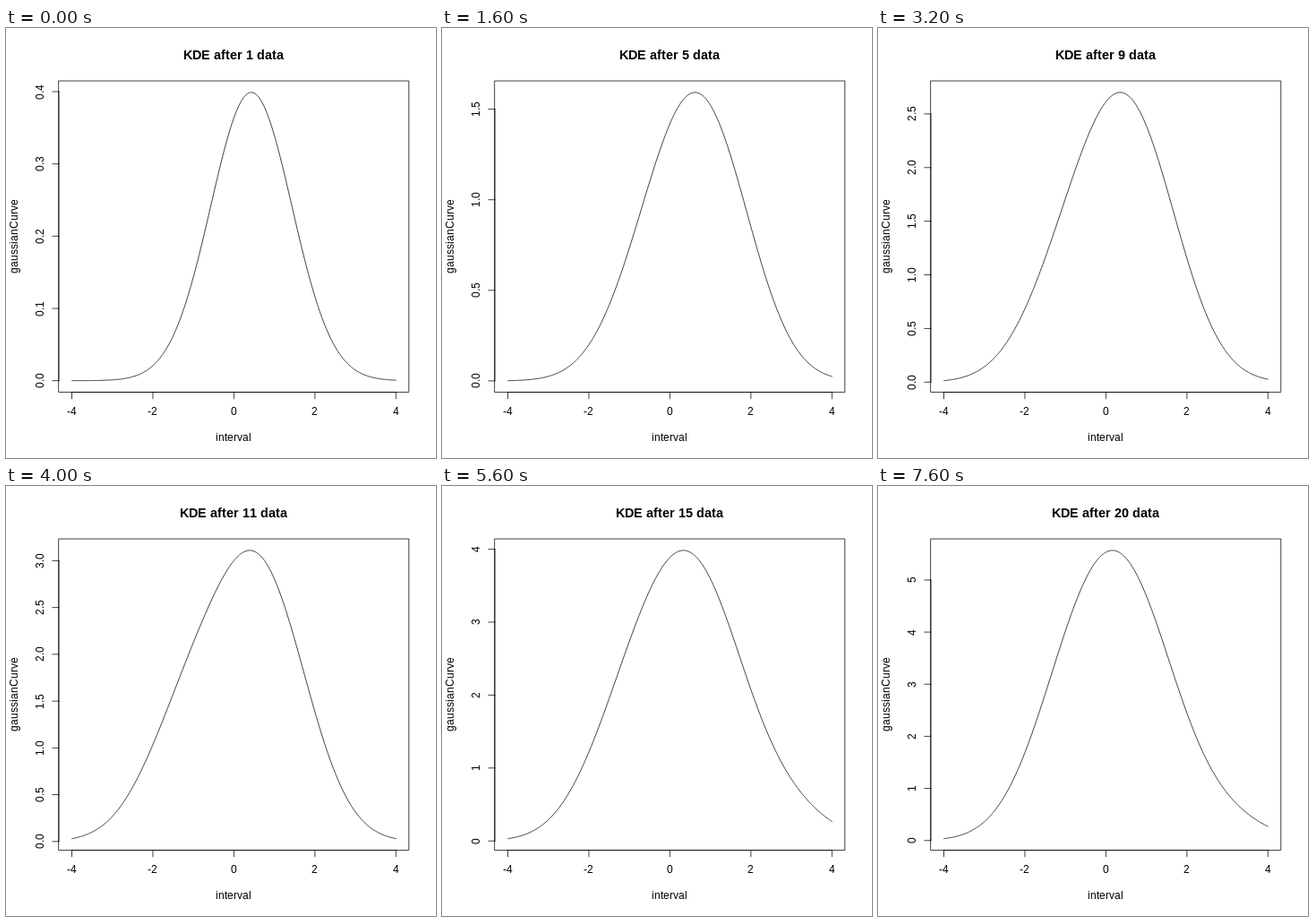
Recreate the animation shown at these times as an HTML page with a canvas. Size 480x480 px, loop 8000 ms.

```html
<!DOCTYPE html>
<html lang="en">
<head>
<meta charset="utf-8">
<title>KDE</title>
<style>
  html, body { margin: 0; width: 100%; height: 100%; overflow: hidden; background: #fff; }
  canvas { display: block; }
</style>
</head>
<body>
<canvas id="plot" width="480" height="480"></canvas>
<script>
const ctx = document.getElementById('plot').getContext('2d');
const STEP = 400;
const FONT = '"Liberation Sans", Arial, sans-serif';
const BOX = { left: 59.04, right: 449.76, top: 59.04, bottom: 406.56 };

// One sample joins the estimate at every step.
const samples = [
  0.43, 1.1, 0.35, -0.6, 1.5, -1.33, 0.75, -0.5, 0.35, 0.95,
  -1.475, -0.5, 2.9, 1.5, 0, 0.4, -0.2, 0.85, -0.7, -0.77
];

const gauss = d => Math.exp(-d * d / 2) / Math.sqrt(2 * Math.PI);
const density = (x, n) => samples.slice(0, n).reduce((sum, s) => sum + gauss(x - s), 0);

// The data fill the box except for a 4% margin on each side.
function scale(min, max, from, to) {
  const pad = (to - from) * 0.04 / 1.08;
  return v => from + pad + (v - min) / (max - min) * (to - from - 2 * pad);
}

function tickStep(range) {
  const cell = range * 1.08 / 5;
  const base = 10 ** Math.floor(Math.log10(cell));
  const c = cell / base;
  return base * (c > 7.78 ? 10 : c > 3.11 ? 5 : c > 1.556 ? 2 : 1);
}

function line(x1, y1, x2, y2) {
  ctx.beginPath();
  ctx.moveTo(x1, y1);
  ctx.lineTo(x2, y2);
  ctx.stroke();
}

// Centred text whose glyphs sit on whole pixels.
function text(str, x, y, { size = 12, weight = 'normal', turned = false } = {}) {
  ctx.font = `${weight} ${size}px ${FONT}`;
  const glyphs = [...String(str)].map(ch => [ch, Math.round(ctx.measureText(ch).width)]);
  const half = glyphs.reduce((sum, g) => sum + g[1], 0) / 2;
  ctx.save();
  if (turned) {
    ctx.translate(x, Math.round(y + half));
    ctx.rotate(-Math.PI / 2);
  } else {
    ctx.translate(Math.round(x - half), y);
  }
  let pen = 0;
  for (const [ch, width] of glyphs) {
    ctx.fillText(ch, pen, 0);
    pen += width;
  }
  ctx.restore();
}

function draw(n) {
  const points = Array.from({ length: 401 }, (_, i) => {
    const x = -4 + i * 0.02;
    return [x, density(x, n)];
  });
  const values = points.map(p => p[1]);
  const min = Math.min(...values), max = Math.max(...values);
  const px = scale(-4, 4, BOX.left, BOX.right);
  const py = scale(min, max, BOX.bottom, BOX.top);

  ctx.fillStyle = '#fff';
  ctx.fillRect(0, 0, 480, 480);
  ctx.fillStyle = ctx.strokeStyle = '#000';
  ctx.lineWidth = 0.75;
  ctx.lineJoin = ctx.lineCap = 'round';

  ctx.beginPath();
  for (const [x, y] of points) ctx.lineTo(px(x), py(y));
  ctx.stroke();

  ctx.strokeRect(BOX.left, BOX.top, BOX.right - BOX.left, BOX.bottom - BOX.top);

  line(px(-4), BOX.bottom, px(4), BOX.bottom);
  for (let x = -4; x <= 4; x += 2) {
    line(px(x), BOX.bottom, px(x), BOX.bottom + 7.2);
    text(x, px(x), 432);
  }

  const step = tickStep(max - min);
  const count = Math.floor((max + (max - min) * 0.04) / step);
  line(BOX.left, py(0), BOX.left, py(count * step));
  for (let i = 0; i <= count; i++) {
    const y = py(i * step);
    line(BOX.left - 7.2, y, BOX.left, y);
    text((i * step).toFixed(step < 0.99 ? 1 : 0), 42, y, { turned: true });
  }

  text(`KDE after ${n} data`, 254.4, 35, { size: 14.4, weight: 'bold' });
  text('interval', 254.4, 461);
  text('gaussianCurve', 13, 232.8, { turned: true });
}

function tick() {
  draw(Math.floor(performance.now() / STEP) % samples.length + 1);
  requestAnimationFrame(tick);
}
tick();
</script>
</body>
</html>
```
